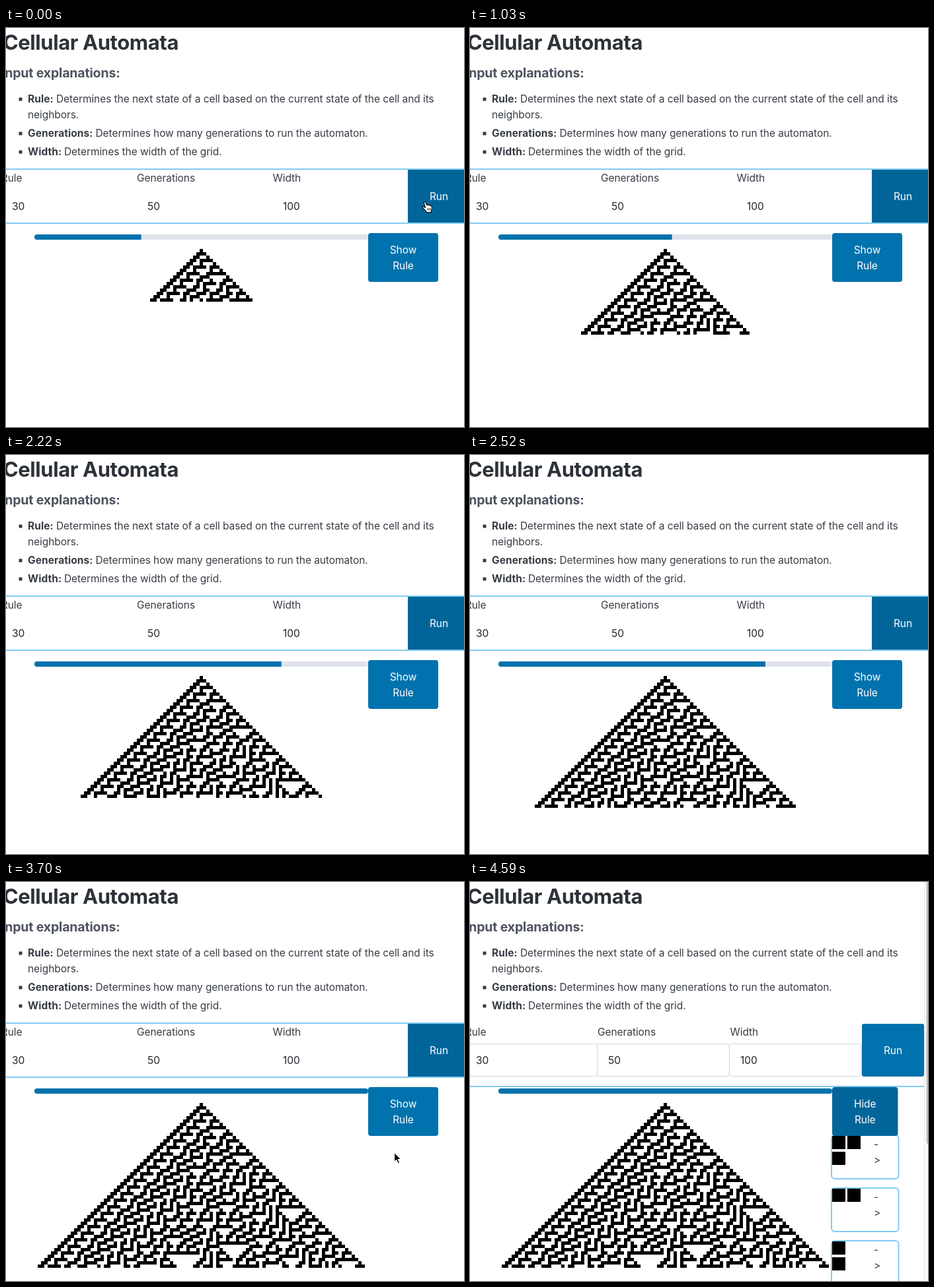
Write an HTML page that moves like this. It is 693 by 605 pixels and loops after 5030 ms.

```html
<!DOCTYPE html>
<html lang="en">
<head>
<meta charset="utf-8">
<title>Cellular Automata</title>
<style>
  html, body { margin: 0; width: 100%; height: 100%; overflow: hidden; background: #fff; }
  svg { display: block; }
  text { font: 15.5px Inter, "Open Sans", sans-serif; letter-spacing: -.07px; fill: #373c44; white-space: pre; }
  .bold { font-weight: 700; letter-spacing: .06px; }
  .title { font-size: 31px; font-weight: 700; letter-spacing: -.4px; fill: #2d3138; }
  .subtitle { font-size: 19.5px; font-weight: 700; letter-spacing: -.16px; fill: #4d535e; }
  .value { fill: #23262c; }
  .onButton { fill: #fff; }
  .middle { text-anchor: middle; }
  .end { text-anchor: end; }
</style>
</head>
<body>
<svg id="stage" width="693" height="605" viewBox="0 0 693 605"></svg>
<script>
const LOOP = 5030, STEP = 148, ROW_TIME = 102.5, GENERATIONS = 50, CELL = 5;
const BLUE = '#0172ad', DARK = '#02659a', FOCUS = '#80ccf3', BORDER = '#cfd5e2';
const stage = document.getElementById('stage');

function add(parent, tag, attrs = {}, content = '') {
  const node = document.createElementNS('http://www.w3.org/2000/svg', tag);
  for (const name in attrs) node.setAttribute(name, attrs[name]);
  node.textContent = content;
  parent.appendChild(node);
  return node;
}
const group = () => add(stage, 'g');
const rect = (parent, x, y, width, height, fill, more = {}) =>
  add(parent, 'rect', { x, y, width, height, fill, ...more });
const text = (parent, x, y, content, cls = '') =>
  add(parent, 'text', { x, y, class: cls }, content);
const show = (node, visible) => node.setAttribute('display', visible ? 'inline' : 'none');

// Heading and list
const page = group();
text(page, 261, 33, 'Cellular Automata', 'title end');
text(page, 172.5, 75, 'Input explanations:', 'subtitle end');
[
  [113, 'Rule:', 76, 'Determines the next state of a cell based on the current state of the cell and its'],
  [165, 'Generations:', 135.5, 'Determines how many generations to run the automaton.'],
  [193, 'Width:', 88, 'Determines the width of the grid.']
].forEach(([y, term, x, description]) => {
  rect(page, 19.5, y - 7.5, 5, 5, '#373c44');
  text(page, 33, y, term, 'bold');
  text(page, x, y, description);
});
text(page, 33, 137, 'neighbors.');

// Input row, in its focused and plain looks
function inputRow(parent, columns, runX, runColor) {
  text(parent, 24.5, 233, 'Rule', 'end');
  text(parent, columns[0][0], 233, 'Generations');
  text(parent, columns[1][0], 233, 'Width');
  text(parent, 9, 276, '30', 'value');
  text(parent, columns[0][1], 276, '50', 'value');
  text(parent, columns[1][1], 276, '100', 'value');
  rect(parent, runX, 215, 94, 80, runColor, { rx: runColor === BLUE ? 3 : 0 });
  text(parent, runX + 47, 261, 'Run', 'onButton middle');
}
function bigButton(parent, width, label, color) {
  const box = rect(parent, 548, 311, width, 74, color, { rx: 4 });
  const center = 548 + width / 2;
  text(parent, center, 342, label, 'onButton middle');
  text(parent, center, 366, 'Rule', 'onButton middle');
  return box;
}

const closedView = group();
rect(closedView, 0, 213, 693, 2, FOCUS);
rect(closedView, 0, 295, 693, 2, FOCUS);
inputRow(closedView, [[198, 214], [403.5, 419]], 608, DARK);

const openView = group();
[-7.5, 192.5, 392.5].forEach(x =>
  rect(openView, x, 245.5, 200, 49, '#fff', { rx: 3.5, stroke: BORDER }));
inputRow(openView, [[193, 209], [393.5, 409]], 593, BLUE);
rect(openView, 0, 309, 687, 2, FOCUS);

// Progress bar and grid
const board = group();
const clip = add(add(stage, 'defs'), 'clipPath', { id: 'bar' });
rect(clip, 43, 313, 505, 8, '#000', { rx: 4 });
const bar = add(board, 'g', { 'clip-path': 'url(#bar)' });
rect(bar, 43, 313, 505, 8, '#dfe3eb');
const progress = rect(bar, 43, 313, 0, 8, BLUE);
const grid = add(board, 'path', { fill: '#000', 'shape-rendering': 'crispEdges' });

// Rule cards, tucked under the button
const cardCells = [[[0, 0], [1, 0], [0, 1]], [[0, 0], [1, 0]], [[0, 0], [0, 1]]];
cardCells.forEach((cells, i) => {
  const y = 385 + i * 80;
  rect(openView, 547, y - 1, 101.5, 66, '#fff', { rx: 5, stroke: FOCUS, 'stroke-width': 2 });
  cells.forEach(([column, line]) => rect(openView, 548 + column * 23, y + line * 24, 20, 20, '#000'));
  text(openView, 611, y + 18, '-');
  text(openView, 611, y + 42, '>');
});

const showButton = bigButton(closedView, 106, 'Show', BLUE);
bigButton(openView, 99.5, 'Hide', DARK);

// Scrollbar
rect(openView, 687, 0, 6, 605, '#fafafa');
rect(openView, 687, 0, 1, 605, '#e6e6e6');
rect(openView, 690.5, -6, 8, 403, '#c1c1c1', { rx: 3 });

// Pointers, with the tip at the origin
const outline = { 'stroke-linejoin': 'round' };
const arrow = group();
add(arrow, 'path', {
  ...outline, d: 'M0 0V14.5L3.3 11.5L5.6 17L8.2 15.9L5.9 10.6H10.3Z',
  fill: '#000', stroke: '#fff', 'stroke-width': 1.2
});
const hand = group();
add(hand, 'path', {
  ...outline,
  d: 'M1 1.6C.3 .2 2.3-.8 3.2 .8L5.4 5.2C6 4.2 7.4 4.4 7.8 5.4C8.6 4.6 9.8 5 10.2 6C11.2 5.4 12.4 6 12.6 7.2C13.2 9.6 13 11.6 11.8 13.6V16H5.2C4.4 13.8 1.8 12-.8 9.4C-2 8-.4 6.8 1 7.8L3 9Z',
  fill: '#fff', stroke: '#000', 'stroke-width': 1.1
});
add(hand, 'path', { d: 'M6.4 9.5V13M8.4 9.5V13M10.4 9.5V13', stroke: '#000', 'stroke-width': .8 });

// Pointer place per step: [shape, x, y]
const pointerPath = {
  0: [hand, 631.5, 263.5], 1: [arrow, 648, 400], 2: [arrow, 654, 482], 3: [arrow, 656, 526], 4: [arrow, 656.5, 536.5],
  25: [arrow, 587.5, 410],
  26: [hand, 594, 364], 27: [hand, 594, 364], 28: [hand, 594, 364],
  29: [arrow, 612, 410], 30: [arrow, 630, 520]
};

// Rule 30: one path string per generation
const rowPaths = [];
let cells = Array.from({ length: 101 }, (_, i) => +(i === 50));
for (let row = 0; row < GENERATIONS; row++) {
  rowPaths.push(cells.map((on, i) =>
    on ? `M${43 + i * CELL} ${335 + row * CELL}h5v5h-5z` : '').join(''));
  cells = cells.map((on, i) => (cells[i - 1] || 0) ^ (on | (cells[i + 1] || 0)));
}

function render(time) {
  const step = Math.min(33, Math.floor((time + 10) / STEP));
  const rows = Math.min(GENERATIONS, 16 + Math.floor(step * STEP / ROW_TIME));
  grid.setAttribute('d', rowPaths.slice(0, rows).join(''));
  progress.setAttribute('width', 505 * rows / GENERATIONS);

  const open = step >= 28;
  show(closedView, !open);
  show(openView, open);
  showButton.setAttribute('fill', step >= 26 ? DARK : BLUE);

  const [shape, x, y] = pointerPath[step] || [];
  [arrow, hand].forEach(node => show(node, node === shape));
  if (shape) shape.setAttribute('transform', `translate(${x} ${y})`);
}

const start = performance.now();
function tick() {
  render((performance.now() - start) % LOOP);
  requestAnimationFrame(tick);
}
tick();
</script>
</body>
</html>
```
